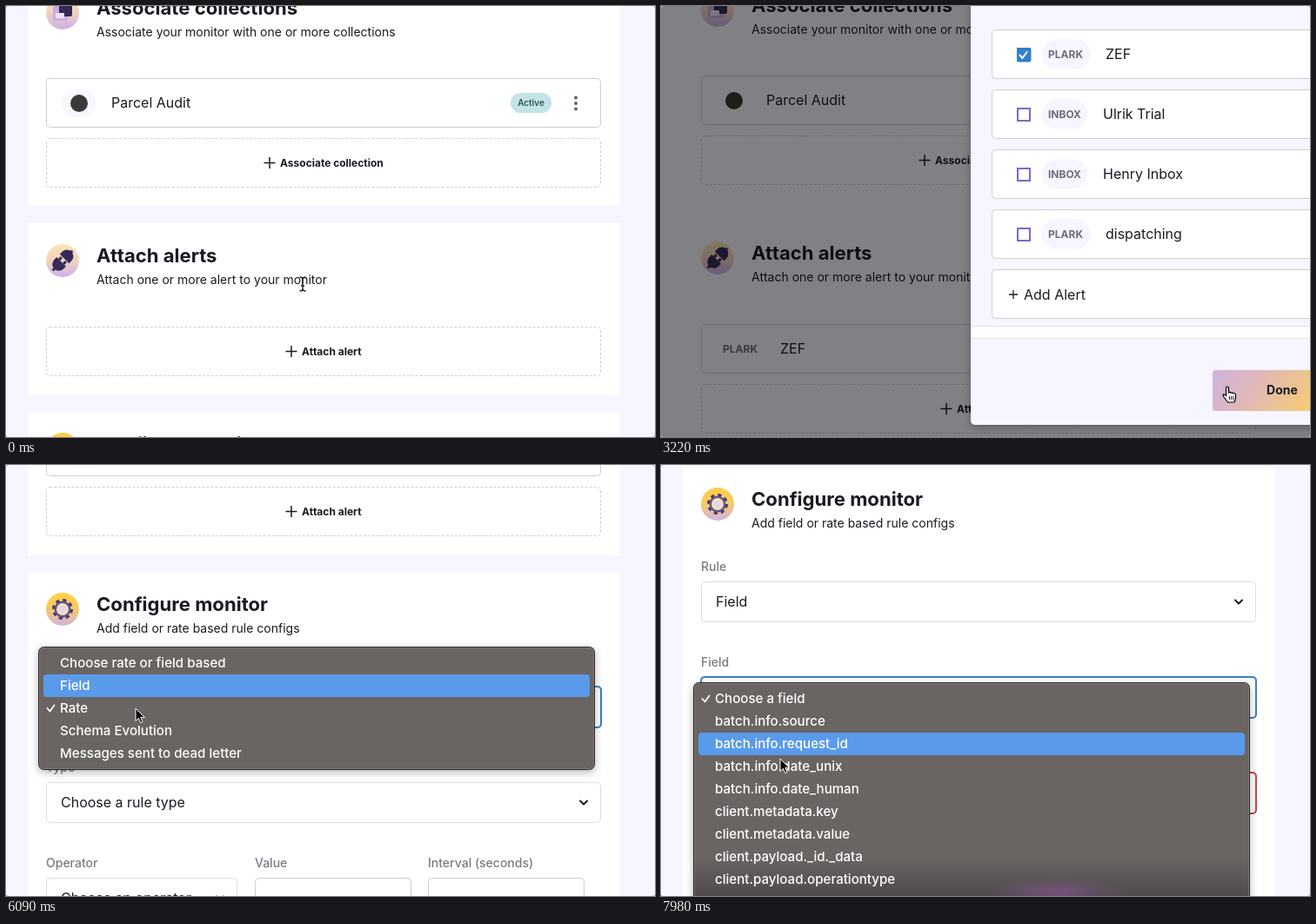
Write an HTML page that moves like this. It is 746 by 496 pixels and loops after 8 s.

```html
<!DOCTYPE html>
<html lang="en">
<head>
<meta charset="utf-8">
<title>Monitor setup</title>
<style>
  html, body { margin: 0; width: 100%; height: 100%; overflow: hidden; background: #a9a8b0; }
  svg { display: block; width: 746px; height: 496px; border-radius: 3px; background: #f7f5ff;
        font-family: Inter, "Open Sans", sans-serif; }
  #flat { mix-blend-mode: darken; }
</style>
</head>
<body>
<svg id="stage" viewBox="0 0 746 496"></svg>
<script>
const INK = '#1a1a22', GREY = '#7b7a82', LINE = '#cfcdd3', LILAC = '#f7f5ff', BLUE = '#3a80c4', RED = '#cf3f3c';

// ---- drawing helpers (text is placed by its vertical middle) ----
const text = (x, y, s, size = 16, weight = 400, fill = INK, anchor = 'start') =>
  `<text x="${x}" y="${y + size * .36}" font-size="${size}" font-weight="${weight}" fill="${fill}" text-anchor="${anchor}">${s}</text>`;
const rect = (x, y, w, h, fill, r = 0, extra = '') =>
  `<rect x="${x}" y="${y}" width="${w}" height="${h}" rx="${r}" fill="${fill}" ${extra}/>`;
const box = (x, y, w, h, stroke = LINE, width = 1, extra = '') =>
  rect(x + .5, y + .5, w - 1, h - 1, '#fff', 4, `stroke="${stroke}" stroke-width="${width}" ${extra}`);
const path = (d, stroke, width, extra = '') =>
  `<path d="${d}" fill="none" stroke="${stroke}" stroke-width="${width}" ${extra}/>`;
const group = (id, body, extra = '') => `<g id="${id}" ${extra}>${body}</g>`;
const plus = (x, y, r, w = 1.5) => path(`M${x - r} ${y}h${2 * r}M${x} ${y - r}v${2 * r}`, INK, w);
const tick = (x, y, s, w = 2) =>
  path(`M${x - 4 * s} ${y}l${3 * s} ${3.5 * s}l${5 * s} ${-7 * s}`, '#fff', w, 'stroke-linecap="round" stroke-linejoin="round"');
const addButton = (y, label, x) =>
  box(46, y, 638, 57, LINE, 1, 'stroke-dasharray="3 2"') + plus(x - 12, y + 28.5, 6.5) + text(x, y + 28.5, label, 12, 700);
const select = (x, y, w, label, stroke = '#dfdde4') => box(x, y, w, 47, stroke) + text(x + 17, y + 23.5, label) +
  path(`M${x + w - 24} ${y + 21.5}l4 4l4 -4`, INK, 2, 'stroke-linecap="round" stroke-linejoin="round"');
const ring = (y, color) => rect(46, y, 638, 47, 'none', 4, `stroke="${color}" stroke-width="2"`);
const label = (x, y, s) => text(x, y, s, 14, 500, GREY);
const error = (y, s) => text(46, y, s, 12, 600, RED);
const gradient = (id, stops, x2, y2) => `<linearGradient id="${id}" x2="${x2}" y2="${y2}">` +
  stops.map((c, i) => `<stop offset="${i / (stops.length - 1)}" stop-color="${c}"/>`).join('') + '</linearGradient>';
const header = (top, title, sub, fill, art) => `<circle cx="65" cy="${top + 43}" r="19" fill="url(#${fill})"/>` +
  `<g transform="translate(65 ${top + 43})">${art}</g>` +
  text(104, top + 37, title, 22.1, 700) + text(104, top + 65, sub, 14);
const tag = (x, y, s, w) => rect(x, y - 17, w, 34, LILAC, 17) + text(x + 7.5, y, s, 12, 700, '#6f6d78');

// ---- section pictures ----
const DARK = '#352a58';
const sheets = rect(-11, -8, 17, 17, '#c9aee6', 2) + rect(-4, -13, 15, 17, DARK, 2) + rect(-8, 0, 10, 6, '#f1e2f4', 1);
const plug = `<g transform="rotate(-45)" fill="${DARK}">` +
  '<path d="M-2 -7.5h-4a7.500 7.500 0 0 0 0 15h4zM3 -7.500h4a7.500 7.500 0 0 1 0 15h-4z"/>' +
  path('M-2 -3.5h4M-2 3.5h4M-16 0h4M12 0h4', DARK, 3) + '</g>';
const gear = '<circle r="10" fill="none" stroke="#43386c" stroke-width="4" stroke-dasharray="4 3.85"/>' +
  '<circle r="9.500" fill="#5f5290"/><circle r="5.800" fill="#e3d6ea" stroke="#f8e2b0" stroke-width="2.400"/>';

// ---- page ----
const upper = rect(25, -35, 681, 265, '#fff') +
  header(-35, 'Associate collections', 'Associate your monitor with one or more collections', 'soft', sheets) +
  box(46, 83, 638, 57) + rect(64, 96, 40, 32, '#f8f7fd', 16) + '<circle cx="84" cy="112" r="10" fill="#3a3a3a"/>' +
  text(121, 111.5, 'Parcel Audit') + rect(580, 100, 47, 23, '#c3e3e6', 11.5) +
  text(603.5, 111.5, 'Active', 10, 600, '#2f5358', 'middle') +
  [105.5, 112, 118.5].map(y => `<circle cx="655" cy="${y}" r="2" fill="#636269"/>`).join('') +
  addButton(152, 'Associate collection', 315) +
  rect(25, 250, 681, 280, '#fff') +
  header(250, 'Attach alerts', 'Attach one or more alert to your monitor', 'soft', plug) +
  group('row', box(46, 369, 638, 57) + tag(63.5, 397.5, 'PLARK', 56) + text(137, 397.5, 'ZEF'));

const C = 467; // top of the configure card
const rateForm = select(46, C + 132, 638, 'Rate', LINE) + label(46, C + 225, 'Type') +
  select(46, C + 242, 638, 'Choose a rule type') + label(46, C + 335, 'Operator') +
  label(286, C + 335, 'Value') + label(485, C + 335, 'Interval (seconds)') +
  select(46, C + 352, 220, 'Choose an operator') + box(286, C + 352, 180, 47) + box(485, C + 352, 180, 47);
const fieldForm = select(46, C + 132, 638, 'Field') + label(46, C + 225, 'Field') +
  select(46, C + 242, 638, 'Choose a field') + group('fieldError', ring(C + 242, RED) + error(C + 300, 'Field is required')) +
  label(46, C + 335, 'Rule') + select(46, C + 352, 638, 'Choose a field rule') + ring(C + 352, RED) +
  error(C + 410, 'Rule is required') + label(46, C + 445, 'Threshold') + label(246, C + 445, 'Interval (seconds)') +
  box(46, C + 462, 180, 47) + box(246, C + 462, 180, 47);
const lower = addButton(369, 'Attach alert', 340) + rect(0, 448, 746, 19, LILAC) + rect(25, C, 681, 700, '#fff') +
  header(C, 'Configure monitor', 'Add field or rate based rule configs', 'warm', gear) + label(46, C + 115, 'Rule') +
  group('rateForm', rateForm) + group('fieldForm', fieldForm) +
  group('ruleFocus', ring(C + 132, BLUE)) + group('fieldFocus', ring(C + 242, BLUE));

// ---- side panel ----
const alerts = [['PLARK', 'ZEF'], ['INBOX', 'Ulrik Trial'], ['INBOX', 'Henry Inbox'], ['PLARK', 'dispatching']];
const panel = rect(356, -20, 420, 502, LILAC, 5, 'filter="url(#shade)"') +
  alerts.map(([kind, name], i) => {
    const y = 55.5 + 69 * i, wide = kind === 'PLARK';
    return box(380, y - 28.5, 420, 57) + rect(410, y - 6.5, 14, 14, '#fff', 0, 'stroke="#8265d0" stroke-width="2"') +
      tag(437.5, y, kind, wide ? 56.5 : 52.5) + text(wide ? 511 : 508, y, name);
  }).join('') +
  group('checked', rect(409, 48, 16.5, 16.5, '#3180cc', 2) + tick(416.5, 56.5, 1)) +
  box(380, 303, 420, 57) + plus(405, 332, 5, 1.3) + text(417, 332, 'Add Alert') +
  rect(356, 368, 420, 15, '#fff') + path('M356 368.5h420M356 382.5h420', '#e2e0e8', 1) +
  rect(634, 419, 160, 47, '#ffd05f', 4) + group('doneHover', rect(634, 419, 160, 47, 'url(#hover)', 4)) +
  text(714, 442, 'Done', 14, 700, INK, 'middle');

// ---- native menus ----
const menu = (id, top, height, items, checked, backdrop = '') => group(id,
  rect(37.5, top + .5, 639, height, '#6b6564', 6, 'stroke="#2e2b2b" filter="url(#shade)"') + backdrop +
  rect(38.5, top + 1.5, 637, height - 2, 'none', 5, 'stroke="#8b8684" stroke-opacity=".6"') +
  rect(43, top + 6, 628, 26, '#5a9aea', 4, `id="${id}Bar"`) +
  items.map((s, i) => text(62, top + 18.7 + 26 * i, s, 15.1, 500, '#fff')).join('') +
  tick(51.5, top + 19 + 26 * checked, 1, 1.8));
const ruleMenu = menu('ruleMenu', 209, 141,
  ['Choose rate or field based', 'Field', 'Rate', 'Schema Evolution', 'Messages sent to dead letter'], 2);
const fieldMenu = menu('fieldMenu', 250, 300, ['Choose a field', 'batch.info.source', 'batch.info.request_id',
  'batch.info.date_unix', 'batch.info.date_human', 'client.metadata.key', 'client.metadata.value',
  'client.payload._id._data', 'client.payload.operationtype', 'client.payload.clustertime.stamp'], 0,
  rect(38, 450, 638, 46, 'url(#dusk)') + '<ellipse cx="455" cy="492" rx="85" ry="18" fill="url(#glow)"/>');

// ---- pointer ----
const pointer = group('pointer',
  group('click', '<circle r="29" fill="none" stroke="#000" stroke-width="3"/>') +
  group('arrow', '<path d="M0 0v14.5l3.4 -3.2l2.4 5.4l2.3 -1l-2.3 -5.3h4.5z" fill="#000" stroke="#fff"/>') +
  group('hand', '<path d="M-1.5 1q1.5 -2 3 0v6q1.5 -1.2 2.7 .3q1.7 -1 2.6 .6q2.4 -.6 2.7 1.6v4l-1.5 4.5h-7.5l-4.5 -6q-2 -3.2 .2 -3.2l2.3 1.8z" fill="#fff" stroke="#000" stroke-width="1.2"/>' +
    path('M2.5 11v4M4.7 11v4M6.9 11v4', '#000', .9)) +
  group('beam', path('M-3.5 -8q3.5 0 3.5 2.5v11q0 2.5 -3.5 2.5M3.5 -8q-3.5 0 -3.5 2.5M0 5.5q0 2.5 3.5 2.5M-2 2h4', '#222', 1.4)));

stage.innerHTML = '<defs>' +
  gradient('soft', ['#fde5b4', '#f1d2c0', '#cbb0ea'], 0, 1) +
  gradient('warm', ['#ffd044', '#f6c966', '#d3b3e2'], 0, 1) +
  gradient('hover', ['#cdb4df', '#dfb7bd', '#edc48c', '#ffd05f'], 1, .2) +
  gradient('dusk', ['#6b6564', '#4f4a4b'], 0, 1) +
  '<radialGradient id="glow"><stop stop-color="#8a5596" stop-opacity=".6"/><stop offset="1" stop-color="#8a5596" stop-opacity="0"/></radialGradient>' +
  '<filter id="shade" x="-10%" y="-10%" width="120%" height="130%"><feDropShadow dx="0" dy="3" stdDeviation="5" flood-opacity=".28"/></filter></defs>' +
  group('page', upper + group('lower', lower)) +
  rect(0, 0, 746, 496, LILAC, 0, 'id="flat"') + rect(0, 0, 746, 496, '#000', 0, 'id="dim"') +
  group('panel', panel) + ruleMenu + fieldMenu + pointer;

// ---- timeline ----
const moves = [[70, 341, 320], [280, 341, 332], [420, 348, 396], [910, 348, 396], [1540, 407, 57], [1750, 407, 57],
  [1820, 410, 58], [2100, 410, 58], [2730, 690, 418], [2940, 651, 438], [3290, 651, 438], [3780, 290, 260],
  [3850, 290, 260], [4410, 222, 236], [4760, 157, 282], [5040, 157, 282], [5600, 149, 284], [5880, 149, 284],
  [6020, 149, 280], [6090, 149, 280], [6160, 150, 257], [6300, 150, 257], [6650, 174, 338], [6720, 174, 338],
  [7070, 146, 268], [7700, 140, 272], [7980, 137, 338]];
const scrolls = [[70, 0], [280, 3], [3500, 3], [3780, 413], [6440, 413], [6650, 495], [6720, 495], [6930, 534]];
const slides = [[490, 0], [840, 1], [3290, 1], [3570, 0]];
const clicks = [420, 1960, 2940, 4830, 6160, 7070];

function at(keys, t) {
  const i = keys.findIndex(k => k[0] > t);
  if (i < 1) return (i ? keys[keys.length - 1] : keys[0]).slice(1);
  const a = keys[i - 1], b = keys[i], u = (t - a[0]) / (b[0] - a[0]), e = u * u * (3 - 2 * u);
  return a.slice(1).map((v, j) => v + (b[j + 1] - v) * e);
}
const $ = id => document.getElementById(id);
const show = (id, on) => $(id).setAttribute('display', on ? 'inline' : 'none');
const shift = (id, x, y) => $(id).setAttribute('transform', `translate(${x} ${y})`);
const within = (t, a, b) => t >= a && t < b;

function draw(t) {
  const [scroll] = at(scrolls, t), [open] = at(slides, t), [x, y] = at(moves, t);
  const attached = t >= 3150, fieldRule = t >= 6300;
  shift('page', 0, -scroll);
  shift('lower', 0, attached ? 69 : 0);
  show('row', attached);
  show('rateForm', !fieldRule);
  show('fieldForm', fieldRule);
  show('ruleFocus', within(t, 5040, 7140));
  show('fieldFocus', t >= 7140);
  show('fieldError', t < 7140);

  $('flat').setAttribute('opacity', open);
  $('dim').setAttribute('opacity', .48 * open);
  show('panel', open > 0);
  shift('panel', 405 * (1 - open), 0);
  show('checked', t >= 2100);
  show('doneHover', within(t, 2800, 3500));

  show('ruleMenu', within(t, 5040, 6230));
  show('fieldMenu', t >= 7280);
  shift('ruleMenuBar', 0, t < 5880 ? 52 : 26);
  shift('fieldMenuBar', 0, t < 7770 ? 0 : t < 7910 ? 26 : 52);

  const beam = t < 350;
  const hand = within(t, 350, 980) || within(t, 1750, 2170) || within(t, 2800, 3430);
  shift('pointer', x, y);
  show('beam', beam);
  show('hand', hand);
  show('arrow', !beam && !hand);
  show('click', clicks.some(c => within(t, c, c + 210)));
}

const start = performance.now();
function play() {
  const t = (performance.now() - start) % 8000;
  draw(Math.floor(t / 70) * 70); // the picture advances every 70 ms
  requestAnimationFrame(play);
}
play();
</script>
</body>
</html>
```
